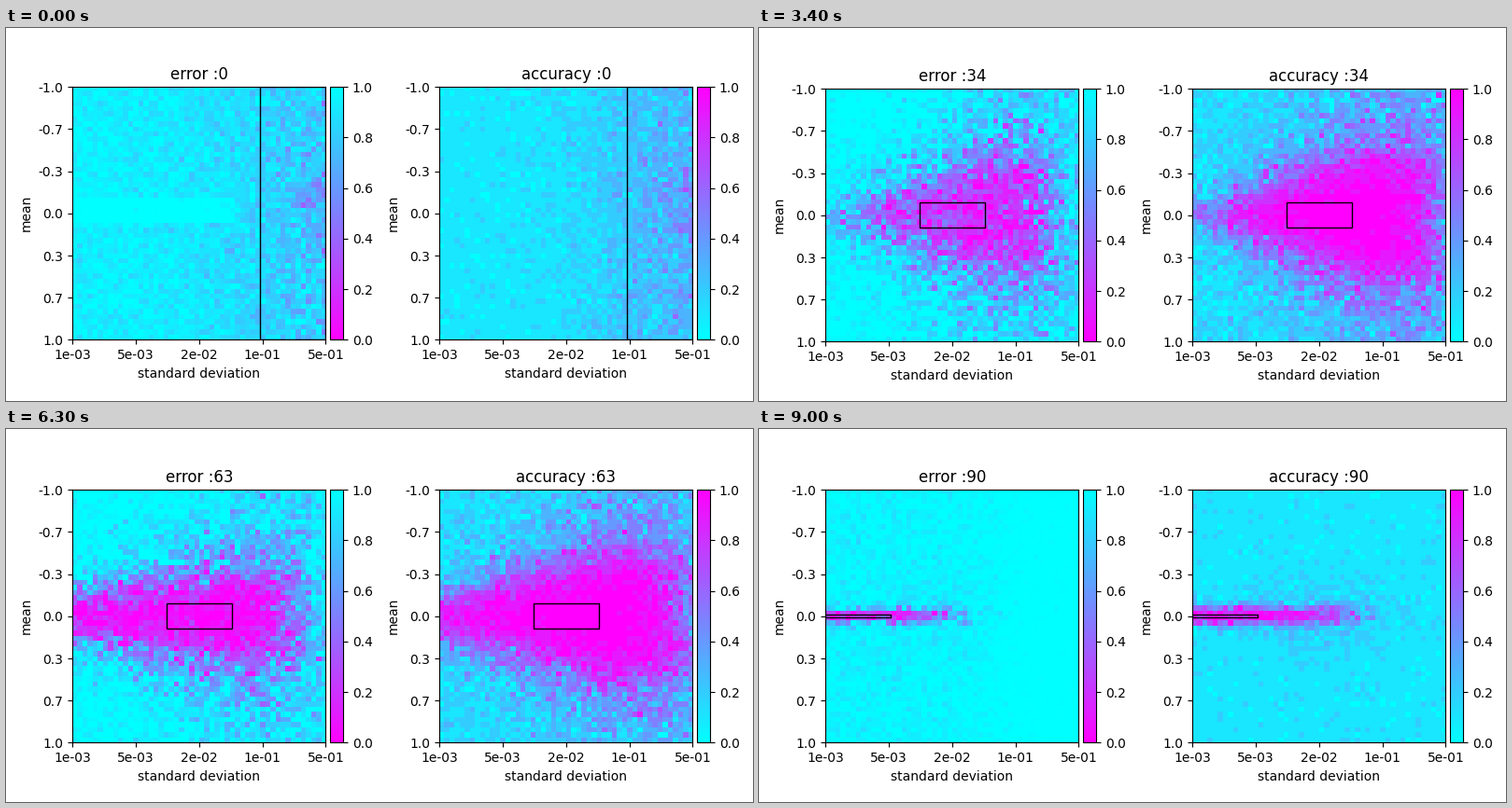
Animation, 800 px wide and 400 px high, one loop 9100 ms. Source, as a matplotlib script:

```python
import numpy as np
import matplotlib.pyplot as plt
from matplotlib.animation import FuncAnimation
from matplotlib.patches import Rectangle

plt.rcParams["font.family"] = "DejaVu Sans"

W, H, SIDE, GRID = 800, 400, 271.2, 50
FRAMES, STEP = 91, 100
SD_MIN, SD_MAX = 1e-3, 5e-1
SWITCH_B, SWITCH_C = 31, 66

cells = (np.arange(GRID) + 0.5) / GRID
u, m = np.meshgrid(cells, 2 * cells - 1)
dist = np.abs(m)


def sig(x):
    return 1 / (1 + np.exp(-np.clip(x, -40, 40)))


def mix(a, b, t):
    return a + (b - a) * t


def log_pos(sd):
    return np.log(sd / SD_MIN) / np.log(SD_MAX / SD_MIN)


# Each phase returns (learned share, base value, base noise) for both panels.

def wide_phase(n):
    """Training on large deviations with any mean."""
    slow = 0.85 * np.exp(-n / 5)
    bend = 0.09 * m**2 - 0.02 * m
    edge = sig((u - 0.8) / 0.05) * np.exp(-m**2 / 0.2)

    s_err = 0.98 * sig((u - 0.35 - slow - bend) / 0.075)
    base = 0.94 - 0.13 * sig((u - 0.62) / 0.12) - 0.06 * edge
    quiet = (m > -0.1) & (m < 0.08) & (u < 0.64)
    err = s_err, np.where(quiet, 1.08, base), 0.05 + 0.03 * u

    s_acc = sig((u - 0.29 - slow - bend) / 0.08)
    base = 0.095 + 0.14 * sig((u - 0.6) / 0.09) + 0.06 * edge
    base = base + 0.06 * (1 - np.exp(-n / 8))
    acc = s_acc, base, 0.035 + 0.03 * sig((u - 0.5) / 0.1)
    return err, acc


def blob(w, end):
    d = w - dist
    k = np.where(d > 0, 0.08, 0.06 + 0.2 * u)
    return sig(d / k) * sig((end - u) / 0.05)


def middle_phase(n):
    """Training on medium deviations with means near zero."""
    reach = np.minimum(u, 0.68)
    top = 1 - max(0.18 - 0.006 * n, 0)
    s_err = top * blob(-0.05 + 0.007 * n + (0.8 - 0.016 * n) * reach, 0.87)
    base = 0.985 + 0.025 * (m < 0) - 0.09 * sig((u - 0.6) / 0.1)
    err = s_err, base, 0.045 + 0.03 * u

    s_acc = blob(-0.03 + 0.006 * n + (0.85 - 0.01 * n) * reach, 0.96)
    acc = s_acc, 0.13 + 0.09 * u, 0.06 + 0.02 * u
    return err, acc


def narrow_phase(n):
    """Training on tiny deviations around zero."""
    early = 0.2 * np.exp(-n / 3)
    k = 0.012 + 0.01 * np.exp(-n / 14)
    halo = np.exp(-(u - 0.5)**2 / 0.06 - m**2 / 0.08)

    s_err = sig((0.044 + early - dist) / k) * sig((0.46 - u) / 0.04)
    calm = sig((u - 0.65) / 0.06)
    base = mix(0.965, 1.01, calm) - 0.06 * halo * (1 - calm)
    err = s_err, base, mix(0.045, 0.012, calm)

    s_acc = sig((0.06 + early - dist) / (k + 0.006)) * sig((0.59 - u) / 0.06)
    acc = s_acc, 0.1 + 0.1 * halo, 0.033 + 0.03 * halo
    return err, acc


def blend(a, b, t):
    return [tuple(mix(x, y, t) for x, y in zip(p, q)) for p, q in zip(a, b)]


def fields(i):
    if i < SWITCH_B:
        err, acc = wide_phase(i)
    elif i < SWITCH_C:
        n = i - SWITCH_B
        err, acc = blend(middle_phase(n), wide_phase(SWITCH_B - 1), np.exp(-n - 1))
    else:
        n = i - SWITCH_C
        last = middle_phase(SWITCH_C - 1 - SWITCH_B)
        err, acc = blend(narrow_phase(n), last, np.exp(-n - 1))

    rng = np.random.default_rng(100 + i)

    def noisy(value, s, sd, spread):
        sd = sd * (1 - s) + spread * np.sqrt(s * (1 - s))
        return value + sd * rng.standard_normal(s.shape)

    s, base, sd = err
    error = np.clip(noisy(base * (1 - s), s, sd, 0.36), 0, 1)
    s, base, sd = acc
    accuracy = np.clip(np.round(noisy(mix(base, 1, s), s, sd, 0.23), 1), 0, 1)
    return error, accuracy


def train_area(i):
    if i < SWITCH_B:
        lo, hi, half = 0.1, 0.5, 1
    elif i < SWITCH_C:
        lo, hi, half = 0.01, 0.05, 0.1
    else:
        lo, hi, half = 0.001, 0.005, 0.01
    x = log_pos(lo)
    return x, -half, log_pos(hi) - x, 2 * half


fig = plt.figure(figsize=(W / 100, H / 100), dpi=100, facecolor="white")
placed = []


def add_axes(left, width):
    ax = fig.add_axes([left / W, 0.16, width / W, SIDE / H])
    placed.append((ax, left, width))
    return ax


def make_panel(left, cmap):
    ax = add_axes(left, SIDE)
    im = ax.imshow(np.zeros((GRID, GRID)), cmap=cmap, vmin=0, vmax=1, aspect="auto",
                   interpolation="nearest", extent=(0, 1, 1, -1))
    box = Rectangle((0, 0), 1, 1, fill=False, ec="black", lw=1)
    ax.add_patch(box)
    sds = np.geomspace(SD_MIN, SD_MAX, 5)
    means = np.linspace(-1, 1, 7).round(3) + 0.0
    ax.set_xticks(np.linspace(0, 1, 5), [f"{v:.0e}" for v in sds])
    ax.set_yticks(np.linspace(-1, 1, 7), [f"{v:.1f}" for v in means])
    ax.set_xlabel("standard deviation")
    ax.set_ylabel("mean")
    fig.colorbar(im, cax=add_axes(left + SIDE + 5, SIDE * 0.05))
    return ax, im, box


panels = [("error", *make_panel(71.2, "cool_r")),
          ("accuracy", *make_panel(464.2, "cool"))]


def update(i):
    top = 63.2 if i == 0 else 65.2
    for ax, left, width in placed:
        ax.set_position([left / W, 1 - (top + SIDE) / H, width / W, SIDE / H])
    for (name, ax, im, box), data in zip(panels, fields(i)):
        im.set_data(data)
        box.set_bounds(*train_area(i))
        ax.set_title(f"{name} :{i}")


anim = FuncAnimation(fig, update, frames=FRAMES, interval=STEP,
                     init_func=lambda: None, repeat=True, repeat_delay=0)
plt.show()
```
